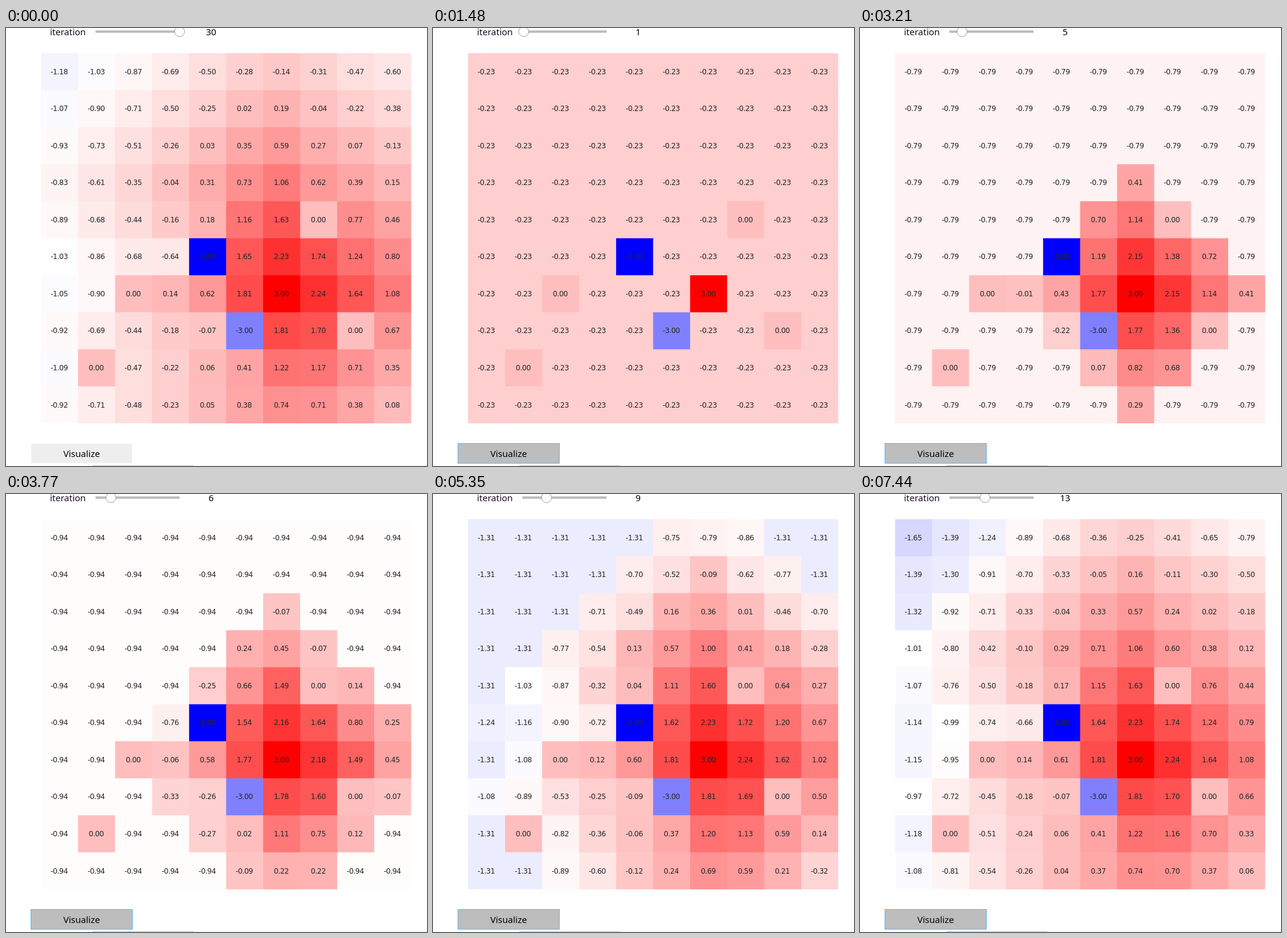
An HTML page for the animation above (8 s loop, 701x728 px).

```html
<!DOCTYPE html>
<html lang="en">
<head>
<meta charset="utf-8">
<title>Value iteration</title>
<style>
  html, body { margin: 0; width: 100%; height: 100%; overflow: hidden; background: #fff; }
  svg { display: block; }
  text { text-anchor: middle; fill: #262626; font: 12px "DejaVu Sans", sans-serif; letter-spacing: -0.5px; }
  .ui text { fill: #000; font: 15px "Noto Sans", "Open Sans", sans-serif; letter-spacing: 0; }
</style>
</head>
<body>
<svg width="701" height="728" viewBox="0 0 701 728">
  <g id="grid"></g>
  <g class="ui">
    <text x="103" y="12" style="fill:#1c0a24">iteration</text>
    <rect x="149" y="4" width="140" height="4" fill="#bdbdbd"/>
    <circle id="thumb" cy="6" r="8.3" fill="#fff" stroke="#9e9e9e"/>
    <text id="count" x="341.5" y="12"></text>
    <rect x="144" y="727" width="168" height="1" fill="#c9bdb9"/>
    <rect x="312" y="727" width="389" height="1" fill="#eee"/>
    <rect id="focus" x="41" y="690" width="170" height="34" fill="#64b5f6"/>
    <rect id="button" x="42" y="691" width="168" height="32"/>
    <text x="126" y="713">Visualize</text>
  </g>
</svg>
<script>
const LOOP = 8000, N = 10, REWARD = -0.23, GAMMA = 0.9;
const LEFT = 58.35, TOP = 41.8, CELL_W = 61.63, CELL_H = 61.53;
const PRESS = 760, RESET = 1000;
const $ = id => document.getElementById(id);

// Row-major cell indices
const ends = { 54: -5, 66: 3, 75: -3 };
const walls = [47, 62, 78, 81];
const moves = [[-1, 0], [0, 1], [1, 0], [0, -1]];

// Blocked moves stay in place
function target(cell, [dr, dc]) {
  const r = Math.floor(cell / N) + dr, c = cell % N + dc, next = r * N + c;
  return r < 0 || c < 0 || r >= N || c >= N || walls.includes(next) ? cell : next;
}

function sweep(values) {
  return values.map((v, cell) => {
    if (cell in ends) return ends[cell];
    if (walls.includes(cell)) return 0;
    const near = moves.map(m => values[target(cell, m)]);
    const gains = near.map((ahead, i) =>
      0.8 * ahead + 0.1 * (near[(i + 1) % 4] + near[(i + 3) % 4]));
    return REWARD + GAMMA * Math.max(...gains);
  });
}

const history = [Array(N * N).fill(0)];
while (history.length < 30) history.push(sweep(history[history.length - 1]));

// Blue - white - red over -5..3
function heat(v) {
  const t = Math.min(255, Math.floor((v + 5) / 8 * 256)) / 255;
  const fade = Math.round(255 * (1 - Math.abs(2 * t - 1)));
  return t < 0.5 ? `rgb(${fade},${fade},255)` : `rgb(255,${fade},${fade})`;
}

function add(name, attrs) {
  const el = document.createElementNS("http://www.w3.org/2000/svg", name);
  for (const key in attrs) el.setAttribute(key, attrs[key]);
  return $("grid").appendChild(el);
}

// Inner cells reach 1px under the next one, so no seams show
const boxes = history[0].map((_, i) => {
  const r = Math.floor(i / N), c = i % N;
  return add("rect", {
    x: LEFT + c * CELL_W,
    y: TOP + r * CELL_H,
    width: CELL_W + (c < N - 1),
    height: CELL_H + (r < N - 1)
  });
});
const labels = history[0].map((_, i) => add("text", {
  x: LEFT + (i % N + 0.5) * CELL_W - 0.6,
  y: Math.round(TOP + (Math.floor(i / N) + 0.5) * CELL_H + 4.2)
}));

// Start times of the grid updates, beginning with the first sweep
const gridTimes = [1480, 2100, 2650, 3210, 3770, 4320, 4800, 5350, 5850, 6400, 6900, 7440];
// The slider trails the grid on two updates
const lag = { 1480: 70, 6900: 80 };
const sliderTimes = gridTimes.map(t => t + (lag[t] || 0));
const passed = (times, t) => times.filter(s => t >= s).length;

let shown = -1;
function drawGrid(step) {
  if (step === shown) return;
  shown = step;
  history[step].forEach((v, i) => {
    boxes[i].setAttribute("fill", heat(v));
    labels[i].textContent = v.toFixed(2);
  });
}

function draw(t) {
  drawGrid(passed(gridTimes, t) || 29);

  const iteration = t < RESET ? 30 : 1 + passed(sliderTimes, t);
  $("thumb").setAttribute("cx", 151 + (iteration - 1) * 138 / 29);
  $("count").textContent = iteration;

  const pressed = t >= PRESS;
  const hover = pressed ? 0 : Math.min(1, Math.max(0, (t - 280) / 310));
  $("focus").style.opacity = pressed ? 1 : 0;
  $("button").style.fill = pressed ? "#bdbdbd" : "#eee";
  $("button").style.filter = hover ? `drop-shadow(0 2px 2px rgba(0,0,0,${0.3 * hover}))` : "none";
}

function tick() {
  draw(performance.now() % LOOP);
  requestAnimationFrame(tick);
}
tick();
</script>
</body>
</html>
```
